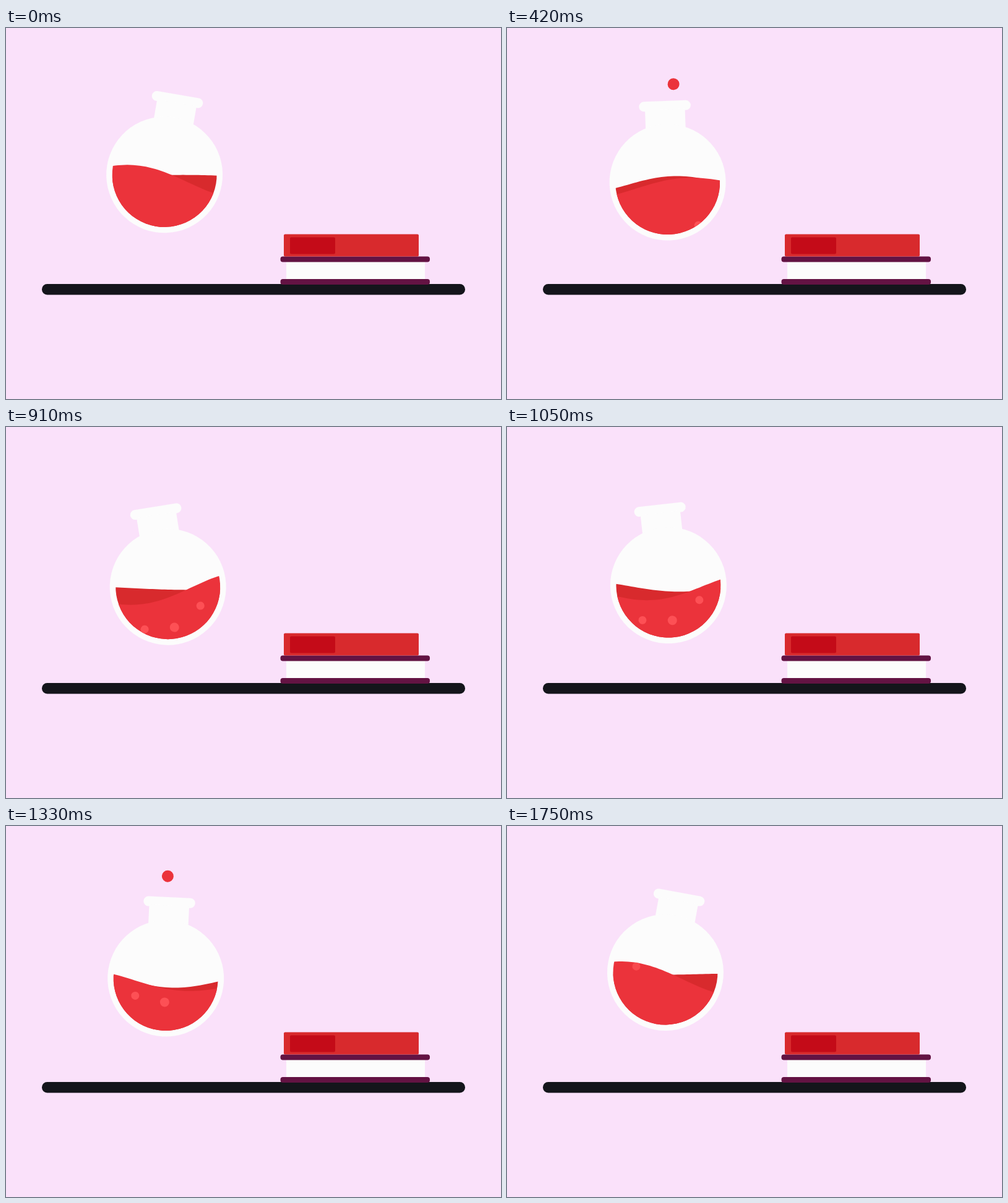
These frames come from a looping animation (800x600 px, 1.82 s). An HTML page with a canvas:

```html
<!DOCTYPE html>
<html lang="en">
<head>
<meta charset="utf-8">
<title>Bubbling flask</title>
<style>
  html, body { margin: 0; width: 100%; height: 100%; overflow: hidden; background: #fae1fa; }
  canvas { display: block; width: 100vw; height: 100vh; filter: blur(0.4px); }
</style>
</head>
<body>
<canvas id="stage" width="800" height="600"></canvas>
<script>
const ctx = document.getElementById('stage').getContext('2d');
const LOOP = 1820, STEP = 70;
const COLORS = {
  bg: '#fae1fa', glass: '#fcfcfc', liquid: '#eb333b', back: '#d82a2d',
  bubble: '#fd5055', shelf: '#14151b', cover: '#631343', label: '#c40b18'
};

// Each wave sloshes (slope) and heaves (crest); the times are when each peaks
const FRONT = { color: COLORS.liquid, level: 6.5, crest: 14, crestAt: 1110, slope: 27.7, slopeAt: 1657 };
const BACK = { color: COLORS.back, level: 2.5, crest: 12, crestAt: 1320, slope: 5, slopeAt: 1270 };

const BUBBLES = [
  { x: 47, r: 6.5, start: 215, end: 1300, speed: 0.067 },
  { x: 0, r: 7.5, start: 625, end: 1640, speed: 0.066 },
  { x: -48, r: 6.5, start: 600, end: 1820, speed: 0.075 }
];
const DROPS = [
  { start: 35, x: 15.3, drift: 0 },
  { start: 900, x: -18, drift: 0.031 }
];
const DROP_LIFE = 790;

// Cosine over one loop that peaks at the given time
const swing = (t, peak) => Math.cos(2 * Math.PI * (t - peak) / LOOP);

function box(color, x0, y0, x1, y1, r = 0) {
  ctx.fillStyle = color;
  ctx.beginPath();
  ctx.roundRect(x0, y0, x1 - x0, y1 - y0, r);
  ctx.fill();
}

function disc(color, x, y, r) {
  ctx.fillStyle = color;
  ctx.beginPath();
  ctx.arc(x, y, r, 0, 2 * Math.PI);
  ctx.fill();
}

function drawShelf() {
  box(COLORS.shelf, 58, 414, 742, 431.5, 8.5);
  box(COLORS.glass, 453, 378, 677, 407);
  box(COLORS.cover, 443.5, 406, 685, 415, 4);
  box(COLORS.cover, 443.5, 369.5, 685, 378.5, 4);
  box(COLORS.back, 449, 333.5, 667, 369.5, 2);
  box(COLORS.label, 459, 338.5, 532, 365.5, 2);
}

// Drops shoot up from the neck and slow down before they vanish
function drawDrops(t) {
  for (const { start, x, drift } of DROPS) {
    const age = t - start;
    if (age < 0 || age > DROP_LIFE) continue;
    disc(COLORS.liquid, x + drift * age, -200 + 1.573e-4 * (900 - age) ** 2, 9.5);
  }
}

function drawWave(wave, t) {
  const heave = wave.crest * swing(t, wave.crestAt);
  const slosh = wave.slope * swing(t, wave.slopeAt);
  ctx.fillStyle = wave.color;
  ctx.beginPath();
  ctx.moveTo(-85, 90);
  for (let x = -85; x <= 85; x += 5) {
    ctx.lineTo(x, wave.level + heave * Math.cos(x / 48) + slosh * Math.sin(x / 63));
  }
  ctx.lineTo(85, 90);
  ctx.fill();
}

function drawBubbles(t) {
  for (const { x, r, start, end, speed } of BUBBLES) {
    if (t < start || t > end) continue;
    ctx.globalAlpha = Math.min(1, 0.4 + (end - t) / 200);
    disc(COLORS.bubble, x, 85 - speed * (t - start), r);
  }
  ctx.globalAlpha = 1;
}

function drawFlask(t) {
  const height = 248 + 11 * swing(t, 835);
  const tilt = (0.3 + 10.1 * swing(t, -105)) * Math.PI / 180;
  ctx.save();
  ctx.translate(259 - 17 * Math.sin(tilt), height);
  ctx.rotate(tilt);
  drawDrops(t);
  box(COLORS.glass, -41.8, -131.5, 41.8, -115.5, 8);
  box(COLORS.glass, -32.3, -118, 32.3, -70);
  disc(COLORS.glass, 0, 0, 94);

  ctx.beginPath();
  ctx.arc(0, 0, 84.5, 0, 2 * Math.PI);
  ctx.clip();
  ctx.rotate(-tilt);
  drawWave(BACK, t);
  drawWave(FRONT, t);
  ctx.rotate(tilt);
  drawBubbles(t);
  ctx.restore();
}

function frame() {
  const t = Math.floor(performance.now() % LOOP / STEP) * STEP;
  ctx.fillStyle = COLORS.bg;
  ctx.fillRect(0, 0, 800, 600);
  drawShelf();
  drawFlask(t);
  requestAnimationFrame(frame);
}
frame();
</script>
</body>
</html>
```
